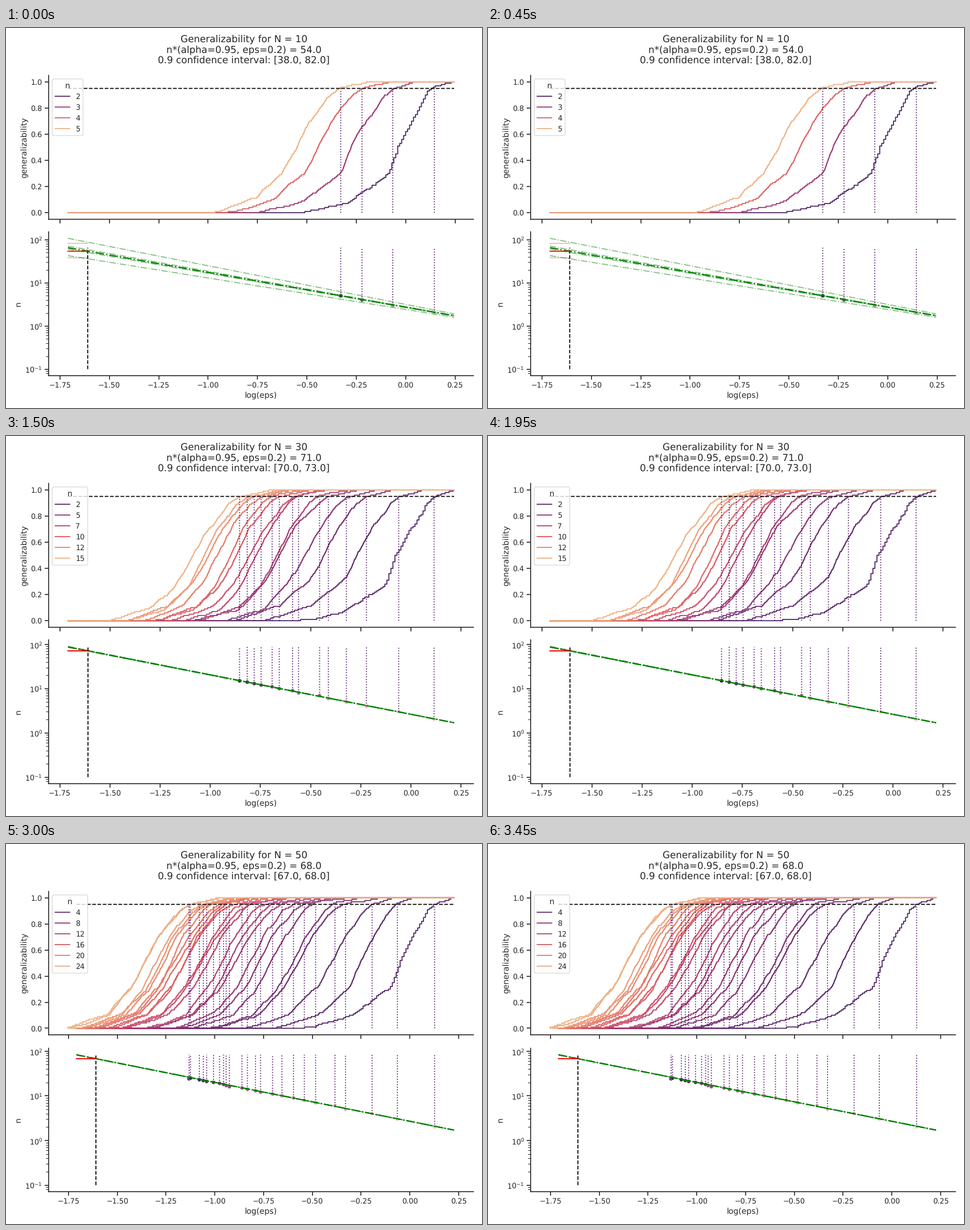
Animation, 837 px wide and 669 px high, one loop 3.75 s. Source, as a matplotlib script:

```python
import numpy as np
import matplotlib.pyplot as plt
from matplotlib.animation import FuncAnimation
from matplotlib.colors import LinearSegmentedColormap
from matplotlib.ticker import MaxNLocator, MultipleLocator

W, H, DPI = 837, 669, 83.7
INK = "0.15"
DOTTED = dict(color="#5a1a6a", linestyle="dotted")
ALPHA, EPS, PAD = 0.95, 0.2, 0.1
X_EPS = np.log(EPS)
X_MIN = X_EPS - PAD

plt.rcParams.update({
    "font.family": "DejaVu Sans", "font.size": 12,
    "text.hinting": "none", "path.snap": False,
    "axes.labelsize": 12, "xtick.labelsize": 11, "ytick.labelsize": 11,
    "legend.fontsize": 11, "legend.title_fontsize": 12,
    "axes.linewidth": 1.4, "lines.linewidth": 1.5,
    "axes.spines.top": False, "axes.spines.right": False,
    "text.color": INK, "axes.labelcolor": INK, "axes.edgecolor": INK,
    "xtick.color": INK, "ytick.color": INK,
    "xtick.major.size": 6, "ytick.major.size": 6, "ytick.minor.size": 4,
    "xtick.major.width": 1.4, "ytick.major.width": 1.4,
    "ytick.minor.width": 0.9,
})

FLARE = LinearSegmentedColormap.from_list("curves", [
    "#4b2362", "#6c2b6d", "#8f3371", "#b13c6c",
    "#d14a61", "#e3685c", "#e98d6b", "#edb081"])
DOTS = LinearSegmentedColormap.from_list("dots", [
    "#edd1cb", "#d499a7", "#aa688f", "#6e4071", "#2d1e3e"])

# N, n*, confidence interval, alpha quantile for n = 2, last value of the fit
RUNS = [
    (10, 54, (38, 82), 0.1455, 1.73),
    (20, 73, (71, 75), 0.0871, 1.65),
    (30, 71, (70, 73), 0.1150, 1.69),
    (40, 76, (74, 77), 0.0787, 1.82),
    (50, 68, (67, 68), 0.1269, 1.71),
]

# Curve shape: distance from the alpha quantile at each level.
LEVELS = (0, .01, .1, .3, .5, .7, .9, ALPHA, 1)
SMALL_N = np.array([-.72, -.65, -.43, -.23, -.18, -.11, -.035, 0, .1])
LARGE_N = np.array([-.64, -.60, -.42, -.30, -.225, -.155, -.05, 0, .16])


def power_fit(start, end, x_max):
    """Log-linear fit through (X_EPS, start) and (x_max, end), and its slope."""
    slope = np.log(end / start) / (x_max - X_EPS)
    return (lambda x: start * np.exp(slope * (np.asarray(x) - X_EPS))), slope


def staircase(n, q, x_max, rng):
    """Empirical distribution of 100 samples for one curve."""
    blend = min((n - 2) / 3, 1)
    shape = (1 - blend) * SMALL_N + blend * LARGE_N
    shape = shape * rng.normal(1, 0.05)
    y = np.arange(1, 101) / 100
    p = 0.65 * (y - 0.005) + 0.35 * np.sort(rng.random(100))
    x = np.round(q + np.interp(p, LEVELS, shape), 2 + (n > 2))
    y, x = y[x < x_max], x[x < x_max]
    return np.r_[X_MIN, x, x_max], np.r_[0, y, y[-1]]


def draw_curves(ax, ns, q, x_max, rng):
    ax.set_ylabel("generalizability")

    def color(n):
        return FLARE(np.clip((n - 2) / (ns[-1] - 2), 0, 1))

    for n, qn in zip(ns, q):
        ax.plot(*staircase(n, qn, x_max, rng), color=color(n),
                drawstyle="steps-post")
    ax.plot([X_MIN, x_max], [ALPHA, ALPHA], "k--")
    ax.vlines(q, 0, ALPHA, **DOTTED)

    entries = ns
    if len(ns) > 6:
        ticks = MaxNLocator(6).tick_values(2, ns[-1])
        entries = [v for v in ticks if 2 <= v < ns[-1] + 1]
    handles = [plt.Line2D([], [], color=color(v)) for v in entries]
    ax.legend(handles, [str(int(v)) for v in entries], title="n",
              loc="upper left")


def draw_fit(ax, ns, q, x_max, star, ci, end, main):
    ax.set_yscale("log")
    ax.set_xlabel("log(eps)")
    ax.set_ylabel("n")
    top = main(X_MIN)
    ax.scatter(q, ns, c=ns, cmap=DOTS, s=36, edgecolor="w", linewidth=0.48)
    ax.vlines(q, ns, top, **DOTTED)

    ends = [X_MIN, x_max]
    ax.plot(ends, main(ends), "g-.", lw=2)
    for bound in ci:
        ax.plot([X_MIN, X_EPS], [bound] * 2, "r", alpha=0.3)
        for spread in (0.2, 1.15):
            ratio = (bound / star) ** spread
            fit, _ = power_fit(star * ratio, end * ratio ** 0.2, x_max)
            ax.plot(ends, fit(ends), "g-.", alpha=0.5)
    ax.plot([X_EPS, X_EPS], [0.1, top], "k--")
    ax.plot([X_MIN, X_EPS], [star] * 2, "r")


def draw(i):
    N, star, ci, q2, end = RUNS[i]
    rng = np.random.default_rng(N)
    x_max = q2 + PAD
    main, slope = power_fit(star, end, x_max)
    ns = np.arange(2, N // 2 + 1)
    q = X_EPS + np.log(ns / star) / slope + rng.normal(-0.005, 0.012, len(ns))
    q[0] = q2

    fig.clf()
    fig.subplots_adjust(left=0.125, right=0.9, bottom=0.11, top=0.88)
    upper, lower = fig.subplots(2, 1, sharex=True)
    fig.suptitle(f"Generalizability for N = {N}\n"
                 f"n*(alpha={ALPHA}, eps={EPS}) = {star:.1f}\n"
                 f"0.9 confidence interval: [{ci[0]:.1f}, {ci[1]:.1f}]",
                 y=0.981, linespacing=1.15)
    draw_curves(upper, ns, q, x_max, rng)
    draw_fit(lower, ns, q, x_max, star, ci, end, main)
    lower.xaxis.set_major_locator(MultipleLocator(0.25))
    fig.tight_layout()


fig = plt.figure(figsize=(W / DPI, (H + 0.01) / DPI), dpi=DPI)
anim = FuncAnimation(fig, draw, frames=len(RUNS), interval=750, repeat=True)
plt.show()
```
